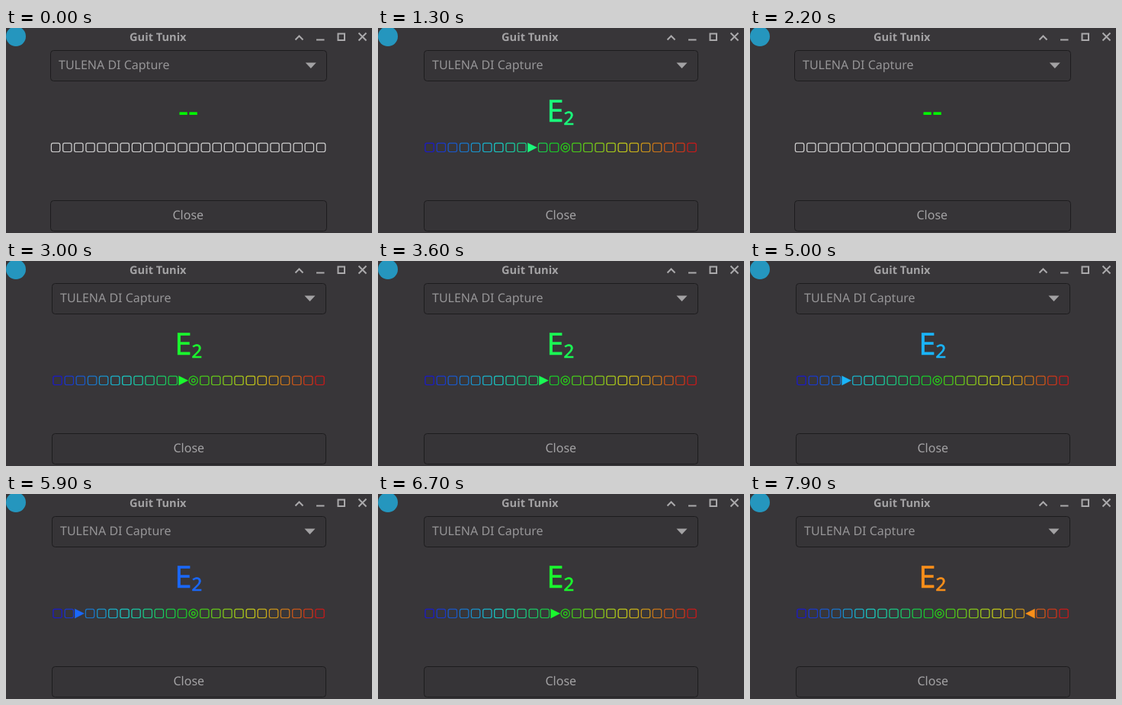
These frames come from a looping animation (480x269 px, 8 s). An HTML page:

```html
<!DOCTYPE html>
<html lang="en">
<head>
<meta charset="utf-8">
<title>Guit Tunix</title>
<style>
  html, body { margin: 0; width: 100%; height: 100%; overflow: hidden; background: #383639; }
  svg { display: block; width: 100%; height: 100%; }
  text { font-family: "Noto Sans", "Open Sans", sans-serif; font-size: 16px; fill: #a3a2a4; text-rendering: geometricPrecision; }
  .title { font-size: 14.6px; font-weight: 700; }
  .device { fill: #969597; }
  .note { font-size: 40px; stroke-width: 0.5; }
  .sub { font-size: 24px; stroke-width: 0.7; }
  .scale { font-family: "DejaVu Sans", sans-serif; stroke-width: 0.25; }
  .box { fill: #363437; stroke: #1d1c1e; }
  .icons { fill: none; stroke: #aaa9ab; stroke-width: 2; }
</style>
</head>
<body>
<svg viewBox="0 0 480 269" preserveAspectRatio="none">
  <rect width="480" height="269" fill="#383639"/>
  <circle cx="13" cy="11" r="13" fill="#2596be"/>
  <text class="title" x="199.3" y="17" text-anchor="middle">Guit Tunix</text>
  <g class="icons">
    <path d="M379.5 15.5l5-5 5 5M407 15.5h10.5M462.5 6.5l10 10m0-10l-10 10"/>
    <rect x="435.5" y="7.5" width="8.5" height="8.5"/>
  </g>

  <rect class="box" y="29.5" height="40" rx="4"/>
  <text id="device" class="device" y="54">TULENA DI Capture</text>
  <path id="arrow" d="M-7 45.5h14l-7 7.5z" fill="#a3a2a4"/>

  <text id="note" class="note" x="239.2" y="122.8" text-anchor="middle"><tspan id="name"></tspan><tspan id="octave" class="sub" dy="4.2"></tspan></text>
  <text id="scale" class="scale" y="161"></text>

  <rect class="box" y="226.5" height="40" rx="4"/>
  <text id="close" y="251" text-anchor="middle">Close</text>
</svg>
<script>
  const LOOP = 8000, CELLS = 24, CENTER = 12;

  // Each pluck: start, end, then [time, needle cell] points
  const plucks = [
    { from: 1100, to: 2000, path: [[1100, 7], [1400, 10], [1900, 11]] },
    { from: 2700, to: 3700, path: [[2700, 9], [2900, 11], [3400, 11], [3600, 10]] },
    { from: 4500, to: 5300, path: [[4500, 7], [4800, 4], [5200, 3]] },
    { from: 5700, to: 6400, path: [[5700, 4], [5900, 2], [6300, 2]] },
    { from: 6600, to: 8000, path: [[6600, 11], [7400, 11], [7600, 22], [7900, 20]] }
  ];

  const $ = id => document.getElementById(id);
  const boxes = document.querySelectorAll(".box");
  const cells = Array.from({ length: CELLS }, () => {
    const cell = document.createElementNS("http://www.w3.org/2000/svg", "tspan");
    return $("scale").appendChild(cell);
  });

  const tint = (i, sat, light) => `hsl(${240 * (1 - i / (CELLS - 1))}, ${sat}%, ${light}%)`;

  function paint(el, color) {
    el.style.fill = el.style.stroke = color;
  }

  function along(path, t) {
    let [t0, v0] = path[0];
    for (const [t1, v1] of path) {
      if (t < t1) return v0 + (v1 - v0) * (t - t0) / (t1 - t0);
      [t0, v0] = [t1, v1];
    }
    return v0;
  }

  function needleAt(t) {
    const pluck = plucks.find(p => t >= p.from && t < p.to);
    return pluck ? Math.round(along(pluck.path, t)) : -1;
  }

  function layout(active) {
    const left = active ? 60.5 : 58.5;
    const right = active ? 419.5 : 420.5;
    for (const box of boxes) {
      box.setAttribute("x", left);
      box.setAttribute("width", right - left);
    }
    $("device").setAttribute("x", active ? 71 : 69);
    $("arrow").setAttribute("transform", `translate(${active ? 398.5 : 399.8} 0)`);
    $("close").setAttribute("x", active ? 239.8 : 238.8);
    $("scale").setAttribute("x", active ? 60 : 57.6);
  }

  function glyph(i, needle) {
    if (needle < 0) return "▢";
    if (i === CENTER) return "◎";
    if (i === needle) return i < CENTER ? "▶" : "◀";
    return "▢";
  }

  let shown;
  function draw(t) {
    const needle = needleAt(Math.floor(t / 100) * 100);
    if (needle === shown) return;
    shown = needle;
    const active = needle >= 0;
    layout(active);
    $("name").textContent = active ? "E" : "--";
    $("octave").textContent = active ? "2" : "";
    const color = active ? tint(needle, 95, 54) : "#0f0";
    paint($("name"), color);
    paint($("octave"), color);
    cells.forEach((cell, i) => {
      cell.textContent = glyph(i, needle);
      const cellColor = i === needle ? color : tint(i, 80, 47);
      paint(cell, active ? cellColor : "#dcdcdc");
    });
  }

  function tick() {
    draw(performance.now() % LOOP);
    requestAnimationFrame(tick);
  }
  tick();
</script>
</body>
</html>
```
